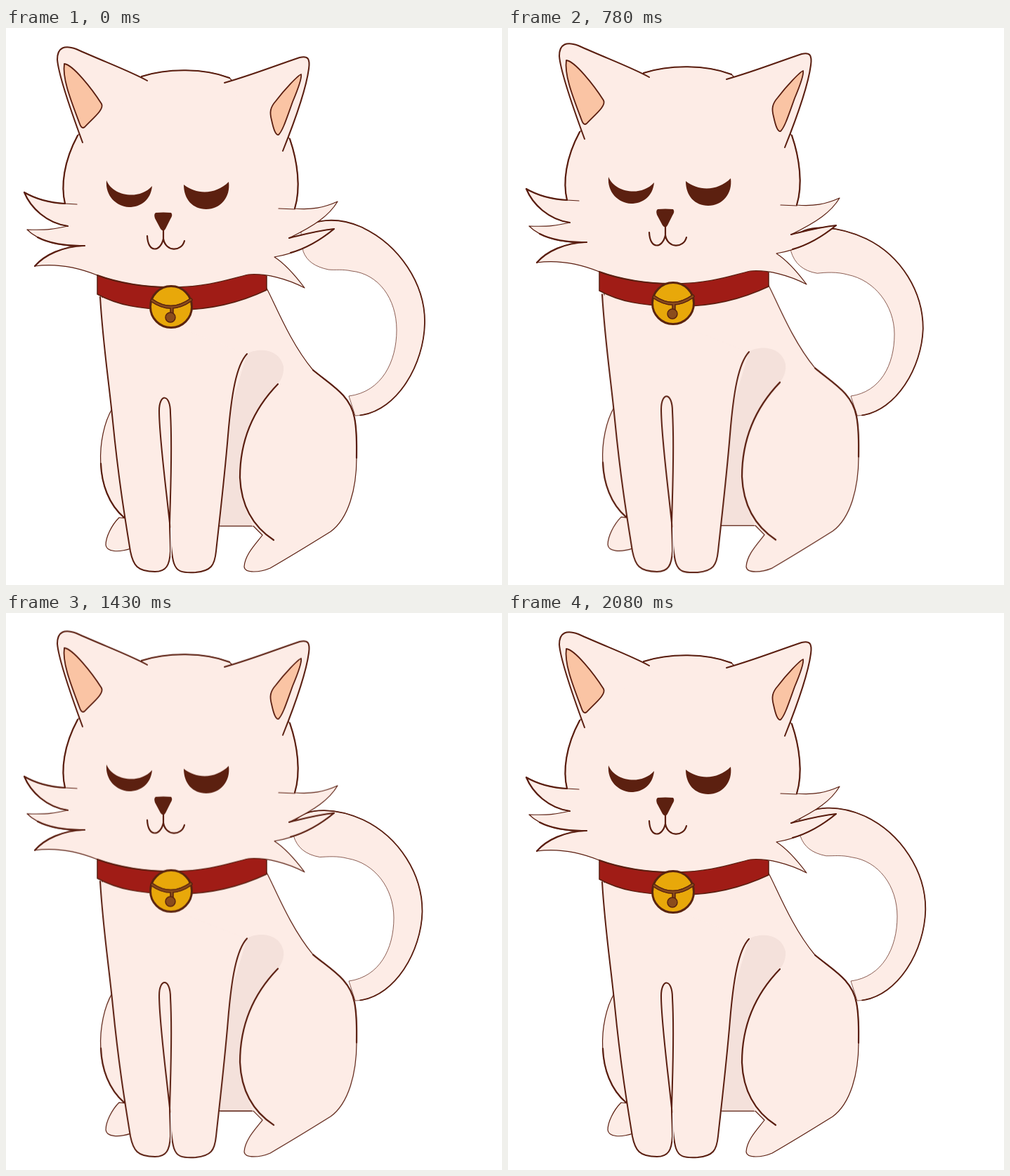
An HTML page without scripts for the animation above (2.21 s loop, 706 by 793 pixels).

```html
<!DOCTYPE html>
<html lang="en">
<head>
<meta charset="utf-8">
<title>Sleepy cat</title>
<style>
  html, body { margin: 0; width: 100%; height: 100%; overflow: hidden; background: #fff; }
  svg { display: block; width: 100%; height: 100%; }

  :root {
    --fur: #fdece6;
    --line: #5a1e10;
    --raised: path("M420 290C435 272 470 268 505 283C560 308 597 365 596 420C595 480 555 550 497 552L488 524C535 518 556 475 556 430C556 385 530 350 492 346C478 343 470 345 459 344C440 340 428 332 423 318Z");
    --lowered: path("M400 304C422 276 477 289 512 306C560 330 589 380 589 431C587 487 548 550 497 552L488 524C528 518 548 482 548 438C548 398 519 362 481 353C465 348 446 349 434 351C413 348 401 336 396 318Z");
  }

  path, circle { stroke-linecap: round; stroke-linejoin: round; }
  .fur { fill: var(--fur); stroke: var(--line); stroke-width: 1.2; }
  .ink { fill: none; stroke: var(--line); stroke-width: 2.2; }
  .fine { stroke-width: 1.2; }
  .bold { stroke-width: 2; }
  .dark { fill: #5c2010; }
  .inner-ear { fill: #fac4a4; stroke: var(--line); stroke-width: 1.8; }

  /* 17 poses of 130 ms; the small lead keeps pose changes on time */
  .tail, .head, .body { animation: 2210ms -2ms infinite steps(4); }
  .tail { d: var(--raised); animation-name: swish; }
  .tail.fur { stroke-width: .7; }
  .tail.ink { stroke-width: 1.8; stroke-dasharray: 53 100; }
  .head { animation-name: lift; }
  .body { animation-name: breathe; transform-origin: 0 775px; }

  @keyframes swish {
    0%, 52.941%, 100% { d: var(--raised); }
    23.529%, 29.411%, 76.47% { d: var(--lowered); }
  }
  @keyframes lift {
    0%, 70.588%, 100% { transform: none; }
    23.529%, 47.058% { transform: translateY(-5px); }
  }
  @keyframes breathe {
    0%, 70.588%, 100% { transform: scaleY(1); }
    23.529%, 47.058% { transform: scaleY(1.0095); }
  }
</style>
</head>
<body>
<svg viewBox="0 0 706 793" preserveAspectRatio="none">
  <path class="tail fur"/>
  <path class="tail ink" pathLength="100"/>

  <g class="body">
    <!-- far hind leg -->
    <path class="fur" d="M161 697C150 708 142 725 142 736C143 746 160 747 178 741L190 700Z"/>
    <path class="fur" d="M151 542C129 580 124 660 168 697L200 640Z"/>
    <path class="ink" d="M135 620C136 649 146 678 168 697"/>

    <!-- torso and near hind leg -->
    <path class="fur" d="M134 365H368C380 385 402 445 437 487C462 508 490 522 496 555C500 575 499 595 499 612C499 655 488 698 462 717C425 740 395 758 376 769C362 775 340 777 339 767C340 750 355 735 365 722L352 709H305L234 705H190L170 600Z"/>
    <path fill="#f4e1db" d="M343 464C352 457 388 452 395 482C396 495 390 503 387 507C350 545 333 590 333 640C335 670 342 690 352 709H305L290 640Z"/>
    <path class="ink fine" d="M305 709H350"/>
    <path class="ink" d="M387 507C350 545 333 590 333 640C335 685 355 712 381 729"/>
    <path class="ink" d="M437 487C462 508 490 522 496 555C500 575 499 595 499 612"/>

    <!-- front legs -->
    <path class="fur bold" d="M134 383C138 450 146 500 152 560C160 640 168 690 177 745C181 765 187 774 212 774C228 774 233 765 234 745C234 730 233 715 233 705C226 640 218 580 218 545C218 520 234 520 234 548C237 600 234 660 233 705C234 730 235 750 239 762C243 774 250 776 270 775C292 773 297 765 299 745C305 690 311 640 316 580C321 520 328 480 343 464"/>
    <path d="M235 712V752" stroke="#fff" stroke-width="1.5"/>
  </g>

  <g class="head">
    <path fill="#a01c16" stroke="#5a1e10" stroke-width="1.5" d="M130 350V379C160 395 190 400 235 401C290 403 335 390 371 373V352L340 345Z"/>

    <!-- face and cheek fur -->
    <path class="fur" d="M193 69C230 57 282 57 318 71L404 158C415 190 420 228 411 257C435 259 452 256 472 247C460 267 440 281 403 299C420 295 440 289 467 286C450 300 420 320 382 326C396 335 410 350 425 370C400 357 370 349 345 351C315 358 290 368 240 369C200 370 160 363 130 352C100 340 70 335 41 339C55 323 80 311 112 310C75 312 45 302 30 287C60 288 70 286 88 282C58 278 35 256 26 234C45 245 65 249 84 250C78 225 82 190 102 153Z"/>
    <path class="ink fine" d="M84 250L101 251M388 257L411 258"/>
    <path class="ink" d="M193 69C230 57 282 57 318 71M404 158C415 190 420 228 411 257M84 250C78 225 82 190 102 153M84 250C65 249 45 245 26 234C35 256 58 278 88 282M112 310C85 311 60 306 45 298M112 310C80 311 55 323 41 339M130 352C160 363 200 370 240 369M403 299C420 295 440 289 467 286C450 300 430 313 405 320"/>

    <!-- ears -->
    <path class="fur bold" d="M109 163C95 125 75 70 73 45C73 27 84 24 100 30C140 48 178 62 201 75"/>
    <path class="fur bold" d="M311 78C350 67 385 53 418 42C430 39 433 44 431 58C427 88 412 130 394 175"/>
    <path class="inner-ear" d="M83 51C95 52 122 86 136 108C140 116 124 128 112 141C108 144 106 140 104 134C92 102 80 72 83 51Z"/>
    <path class="inner-ear" d="M420 66C416 67 396 88 384 104C376 113 375 120 378 131C381 145 384 153 388 152C394 146 399 130 408 105C416 86 421 70 420 66Z"/>

    <!-- features -->
    <path class="dark" d="M143 217C152 239 189 246 208 225C206 245 192 255 175 255C157 254 141 239 143 217Z"/>
    <path class="dark" d="M253 223C272 238 299 237 317 219C320 241 305 258 285 258C266 258 253 244 253 223Z"/>
    <path class="dark" d="M213 263Q224 262 235 263Q238 266 234 272L227 286Q224 291 220 286L212 271Q210 265 213 263Z"/>
    <path class="ink" d="M224 288V300C220 319 202 321 201 296M224 300C227 319 250 319 254 303"/>

    <!-- bell -->
    <circle cx="235" cy="397" r="29.5" fill="#e8a80a" stroke="#5a2410" stroke-width="3"/>
    <g fill="none" stroke="#5a2410" stroke-width="5">
      <path id="band" d="M208 388Q235 407 263 387M236 398V407"/>
      <use href="#band"/>
    </g>
    <path fill="none" stroke="#8a4c1c" stroke-width="2.4" d="M208 388Q235 407 263 387M236 398V407"/>
    <circle cx="234" cy="412" r="7" fill="#8a4c1c" stroke="#5a2410" stroke-width="1.5"/>
  </g>
</svg>
</body>
</html>
```
